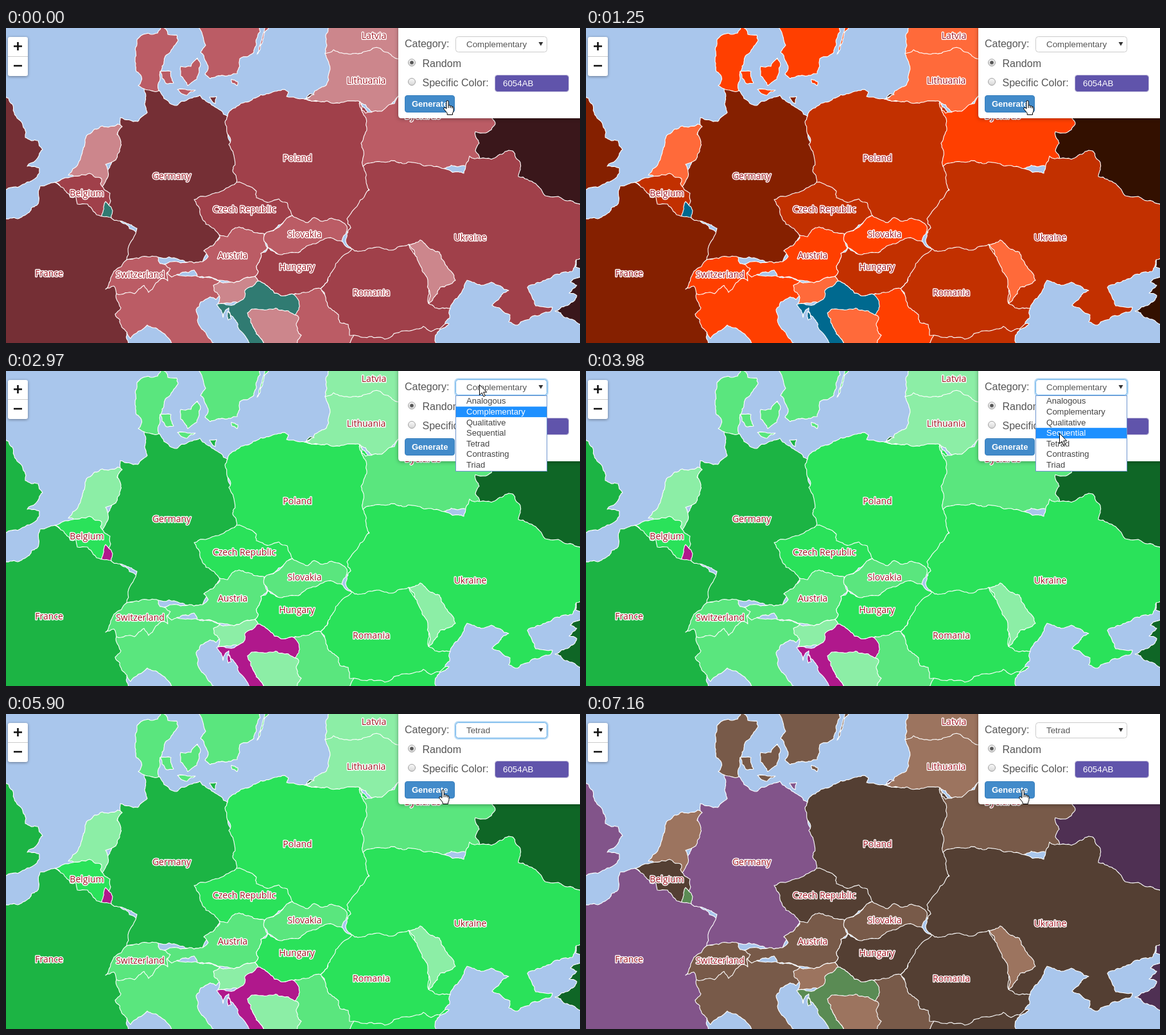
Animation, 894 px wide and 492 px high, one loop 8000 ms. Source, as an HTML page:

```html
<!DOCTYPE html>
<html lang="en">
<head>
<meta charset="utf-8">
<title>Map colour generator</title>
<style>
html, body { margin: 0; width: 100%; height: 100%; overflow: hidden; }
svg { display: block; width: 894px; height: 492px; background: #a9c6ec; }
#map { stroke: #fff; stroke-width: 1.1; stroke-linejoin: round; }
.a { fill: var(--a); } .b { fill: var(--b); } .c { fill: var(--c); }
.d { fill: var(--d); } .e { fill: var(--e); } .f { fill: var(--f); }
#labels { font: 14px "Open Sans", "Noto Sans", sans-serif; text-anchor: middle;
  fill: #a01420; stroke: #fff; stroke-width: 3px; stroke-linejoin: round; paint-order: stroke; }
#panel { font: 16px "Liberation Sans", Arial, sans-serif; fill: #555; }
#panel .small { font-size: 13.333px; }
#card { fill: #fff; filter: drop-shadow(0 1px 3px rgba(0,0,0,.35)); }
#list { font-size: 13px; }
#zoom { filter: drop-shadow(0 1px 2px rgba(0,0,0,.4)); }
.cursor { fill: #fff; stroke: #000; stroke-linejoin: round; }
</style>
</head>
<body>
<svg id="stage" viewBox="0 0 894 492">
  <defs>
    <linearGradient id="knob" x2="0" y2="1"><stop stop-color="#fafafa"/><stop offset="1" stop-color="#d6d6d6"/></linearGradient>
  </defs>

  <!-- Painted in order: later lands cover the borders of earlier ones. -->
  <g id="map">
    <polygon class="a" id="britain" points="-5,104 10,119 20,143 31,163 30,171 50,176 57,190 46,207 33,216 52,219 48,233 18,249 -5,252"/>
    <polygon class="a" id="france" points="-5,300 18,298 48,277 53,247 76,241 155,285 215,330 190,400 190,498 -5,498"/>
    <polygon class="a" id="germany" points="178,152 178,140 205,146 211,139 220,132 215,95 240,99 246,110 266,121 302,105 345,138 365,235 340,320 306,368 270,362 237,358 188,362 190,345 204,313 186,304 164,297 150,245 165,205"/>
    <polygon class="a" id="ruegen" points="317,108 328,107 326,118"/>
    <polygon class="d" id="netherlands" points="97,230 104,220 117,200 128,166 150,153 174,150 181,154 173,166 179,178 178,187 171,206 155,213 159,225 150,248 120,235"/>
    <polygon class="b" id="belgium" points="76,241 104,232 118,229 130,227 149,236 147,243 162,258 163,270 148,294 127,275 111,275 109,264 100,264 85,248"/>
    <polygon class="e" id="luxembourg" points="155,271 166,285 164,296 149,294"/>
    <polygon class="c" id="jutland" points="215,95 206,90 211,76 203,68 204,18 218,9 236,8 243,-4 252,10 266,11 268,20 250,42 240,78 238,98"/>
    <polygon class="c" id="funen" points="240,68 257,68 261,86 250,87"/>
    <polygon class="c" id="zealand" points="272,60 288,60 298,47 303,57 297,80 283,90 272,75"/>
    <polygon class="c" id="lolland" points="267,96 283,97 295,97 282,105"/>
    <polygon class="c" id="bornholm" points="351,80 361,84 360,90 352,86"/>
    <polygon class="c" id="sweden" points="298,-5 311,27 303,38 315,63 310,72 318,79 360,71 364,48 386,38 396,-5"/>
    <polygon class="c" id="oland" points="410,-3 391,41 403,-3"/>
    <polygon class="b" id="poland" points="345,138 348,130 385,110 434,96 440,100 437,107 465,111 551,112 570,150 570,240 535,320 440,300 380,265 359,241 353,222 356,205 347,182 350,175 341,147"/>
    <polygon class="d" id="latvia" points="497,40 498,14 505,-5 625,-5 625,60 550,48"/>
    <polygon class="d" id="lithuania" points="499,46 497,40 510,34 537,41 580,31 620,50 630,90 580,140 551,115 500,114 465,111 499,89 503,56"/>
    <polygon class="f" id="spit" points="466,111 473,103 480,104"/>
    <polygon class="c" id="belarus" points="551,115 554,128 560,133 585,130 605,118 612,105 640,80 800,80 750,215 600,220 556,216 557,192 553,180 562,157"/>
    <polygon class="f" id="russia" points="757,130 757,141 762,150 747,164 731,162 737,180 731,192 738,205 800,260 900,290 900,130"/>
    <polygon class="f" id="azov" points="900,357 888,362 887,373 900,378"/>
    <polygon class="f" id="kuban" points="900,388 879,397 889,402 877,414 889,418 877,432 855,442 870,452 900,464"/>
    <polygon class="b" id="ukraine" points="556,216 575,209 600,207 620,212 645,212 713,227 716,214 722,200 756,205 777,193 789,192 801,210 798,232 825,243 840,262 900,280 900,359 888,362 882,380 855,385 812,405 825,434 851,436 848,443 820,450 797,464 783,459 785,448 757,433 783,410 756,397 740,402 718,394 692,437 665,440 539,347 529,333 537,312 531,298 566,253 558,222"/>
    <polygon class="c" id="italy" points="172,415 205,395 250,383 298,388 333,396 335,410 327,424 318,420 303,428 296,440 302,466 330,497 265,497 240,473 220,464 194,485 170,447 179,437"/>
    <polygon class="c" id="austria" points="332,323 357,308 403,320 407,343 397,352 390,372 393,380 388,388 355,398 298,388 293,378 258,389 240,368 252,367 306,365 315,357 308,348 333,328"/>
    <polygon class="c" id="switzerland" points="188,362 212,357 237,358 240,368 256,376 250,383 252,395 243,391 228,408 222,413 215,402 200,415 172,415 168,403 155,408 168,380"/>
    <polygon class="b" id="czechia" points="359,241 321,259 293,268 302,283 306,299 332,323 345,326 357,312 403,322 446,293 438,273 425,267 410,272 390,265 390,255"/>
    <polygon class="c" id="slovakia" points="446,293 470,304 480,296 493,302 507,297 522,302 531,310 523,333 480,345 430,358 408,343 402,333 403,322 428,308 437,297"/>
    <polygon class="b" id="bulgaria" points="528,470 690,462 672,475 668,497 530,500"/>
    <polygon class="c" id="serbia" points="448,416 490,405 545,470 532,498 440,498"/>
    <polygon class="d" id="slovenia" points="393,395 367,430 330,430 332,418 324,410 323,402 333,396 355,398 388,388"/>
    <polygon class="e" id="croatia" points="393,395 428,418 448,416 452,420 456,440 448,450 385,448 384,465 404,497 385,497 364,472 356,455 347,437 338,452 328,432 358,430 372,420 372,410"/>
    <polygon class="e" id="cres" points="345,443 351,454 346,456"/>
    <polygon class="d" id="bosnia" points="383,439 410,439 448,447 456,452 452,462 460,480 452,497 404,497 384,465 376,445"/>
    <polygon class="b" id="romania" points="539,345 548,349 570,344 600,347 627,338 650,375 661,400 658,430 668,437 692,438 691,453 675,470 662,474 650,466 620,473 590,486 535,480 533,463 520,460 518,448 503,437 490,407 500,397 515,355"/>
    <polygon class="d" id="moldova" points="627,338 645,331 655,340 675,350 678,360 700,394 676,405 672,415 658,430 661,418 656,390 640,358"/>
    <polygon class="b" id="hungary" points="404,350 408,343 430,354 455,351 478,337 510,329 523,333 539,345 521,360 500,397 490,407 448,416 428,418 393,395 388,388 393,380 390,372 397,352"/>
  </g>

  <g id="labels">
    <text x="573" y="17">Latvia</text>
    <text x="561" y="87">Lithuania</text>
    <text x="649" y="142">Byelarus</text>
    <text x="454" y="208">Poland</text>
    <text x="258" y="236">Germany</text>
    <text x="126" y="263">Belgium</text>
    <text x="371" y="288">Czech Republic</text>
    <text x="465" y="327">Slovakia</text>
    <text x="353" y="360">Austria</text>
    <text x="453" y="378">Hungary</text>
    <text x="209" y="390">Switzerland</text>
    <text x="67" y="388">France</text>
    <text x="569" y="418">Romania</text>
    <text x="723" y="332">Ukraine</text>
  </g>

  <g id="zoom">
    <rect x="3" y="14" width="31" height="61" rx="3" fill="#fff"/>
    <path d="M3 44.5h31" stroke="#ccc"/>
    <path d="M12 28.5h13M18.5 22v13M12 59h13" stroke="#111" stroke-width="2.6"/>
  </g>

  <g id="panel">
    <path id="card" d="M611-8H902V141H616q-5 0-5-5z"/>
    <text x="621" y="30">Category:</text>
    <text x="648.5" y="61">Random</text>
    <text x="648.5" y="91">Specific Color:</text>
    <g fill="url(#knob)" stroke="#a3a3a3">
      <circle cx="632" cy="54" r="5.5"/><circle cx="632" cy="84" r="5.5"/>
    </g>
    <circle cx="632" cy="54" r="2.8"/>
    <rect id="ring" x="699.5" y="12.5" width="144" height="26" rx="5" fill="none" stroke="#66afe9" stroke-width="3" opacity=".45"/>
    <rect id="select" x="700.5" y="13.5" width="142" height="24" rx="4" fill="#fff" stroke="#ccc"/>
    <text id="choice" class="small" x="717" y="30"></text>
    <path d="M829.5 22h7l-3.5 6z" fill="#333"/>
    <rect x="761.5" y="73.5" width="115" height="26" rx="4" fill="#6054ab" stroke="#c4c0dc"/>
    <text class="small" x="774" y="91" fill="#fff">6054AB</text>
    <rect x="621.5" y="105.5" width="77" height="26" rx="3.5" fill="#428bca" stroke="#357ebd"/>
    <text x="632" y="123" fill="#fff" style="font-size:13px;font-weight:bold">Generate</text>
    <g id="list">
      <rect x="700.5" y="38.5" width="142" height="118" fill="#fff" stroke="#6f96d0"/>
      <rect id="bar" x="701" width="141" height="16.5" fill="#1e90ff"/>
    </g>
  </g>

  <path id="arrow" class="cursor" d="M.5 .5v16l3.7-3.5 2.6 5.8 2.5-1.1-2.6-5.6h5z"/>
  <path id="hand" class="cursor" d="M5 2a1.6 1.6 0 0 1 3.2 0V8q2.4-.8 2.9.8 2.3-.6 2.7 1 2.2-.2 2.2 1.800v4.200q0 2.400-1.500 4.200v2.500H6.200V20L1 13.600q-.9-2 1-2.400 1.400 0 3 2zM8.200 8v4M11.100 9v3M13.800 10v2.500"/>
</svg>

<script>
const $ = id => document.getElementById(id);

const palettes = [
  ['#752f35', '#a0404a', '#bb5c65', '#cc868c', '#307b72', '#3a171b'],
  ['#852000', '#c23000', '#ff3f00', '#ff6a3a', '#00698f', '#331000'],
  ['#1cb444', '#2ae25a', '#5ae67e', '#8ceea6', '#b0188c', '#0f6626'],
  ['#82548a', '#543f33', '#785a49', '#9c745f', '#5a8b54', '#4f3053']
];
const options = ['Analogous', 'Complementary', 'Qualitative', 'Sequential', 'Tetrad', 'Contrasting', 'Triad'];

// Each row: start in ms, then the values held until the next row.
const colours = [[0, 0], [530, 1], [1810, 2], [7160, 3]];
const picked = [[0, 1], [5190, 4]];
const focus = [[0, 0], [2970, 1], [6610, 0]];
const open = [[0, 0], [2970, 1], [5190, 0]];
const hover = [[0, 1], [3830, 2], [3980, 3], [4100, 4]];
const pointer = [
  [0, 'hand', 681, 113], [2210, 'arrow', 698, 97], [2330, 'arrow', 714, 68], [2460, 'arrow', 730, 38],
  [2580, 'arrow', 737, 22], [2720, 'arrow', 737, 21], [3560, 'arrow', 737, 41], [3710, 'arrow', 737, 60],
  [3830, 'arrow', 737, 83], [3980, 'arrow', 737, 97], [4100, 'arrow', 737, 107], [5470, 'arrow', 721, 107],
  [5630, 'hand', 690, 115], [5750, 'hand', 675, 119], [5900, 'hand', 674, 118]
];

const noise = (x, y) => {
  const n = Math.sin(x * 12.9898 + y * 78.233) * 43758.5453;
  return (n - Math.floor(n)) * 2 - 1;
};

// Splits an edge into a ragged line, the same in both directions.
function ragged(p, q) {
  const dx = q[0] - p[0], dy = q[1] - p[1], len = Math.hypot(dx, dy);
  if (len < 4.5) return [q];
  const side = dx > 0 || (dx === 0 && dy > 0) ? 1 : -1;
  const k = noise(p[0] + q[0], p[1] + q[1]) * Math.min(0.14, 2.6 / len) * side;
  const mid = [(p[0] + q[0]) / 2 - dy * k, (p[1] + q[1]) / 2 + dx * k];
  return [...ragged(p, mid), ...ragged(mid, q)];
}

for (const land of $('map').children) {
  const pts = land.getAttribute('points').split(' ').map(s => s.split(',').map(Number));
  const edge = pts.flatMap((p, i) => ragged(p, pts[(i + 1) % pts.length]));
  land.setAttribute('points', edge.map(p => p.map(v => v.toFixed(1))).join(' '));
}

const rowTop = i => 39 + i * 16.6;
const rows = options.map((name, i) => {
  const el = document.createElementNS('http://www.w3.org/2000/svg', 'text');
  el.setAttribute('x', 717);
  el.setAttribute('y', rowTop(i) + 12.4);
  el.textContent = name;
  return $('list').appendChild(el);
});

const at = (table, t) => table.filter(row => row[0] <= t).pop().slice(1);
const show = (el, on) => { el.style.display = on ? '' : 'none'; };

function draw(t) {
  palettes[at(colours, t)[0]].forEach((c, i) => $('stage').style.setProperty('--' + 'abcdef'[i], c));
  $('choice').textContent = options[at(picked, t)[0]];

  const focused = at(focus, t)[0];
  show($('ring'), focused);
  $('select').setAttribute('stroke', focused ? '#66afe9' : '#ccc');

  const active = at(hover, t)[0];
  show($('list'), at(open, t)[0]);
  $('bar').setAttribute('y', rowTop(active));
  rows.forEach((row, i) => row.setAttribute('fill', i === active ? '#fff' : '#444'));

  const [shape, x, y] = at(pointer, t);
  for (const id of ['arrow', 'hand']) {
    show($(id), id === shape);
    $(id).setAttribute('transform', `translate(${x} ${y})`);
  }
}

const start = performance.now();
function tick() {
  draw((performance.now() - start) % 8000);
  requestAnimationFrame(tick);
}
tick();
</script>
</body>
</html>
```
